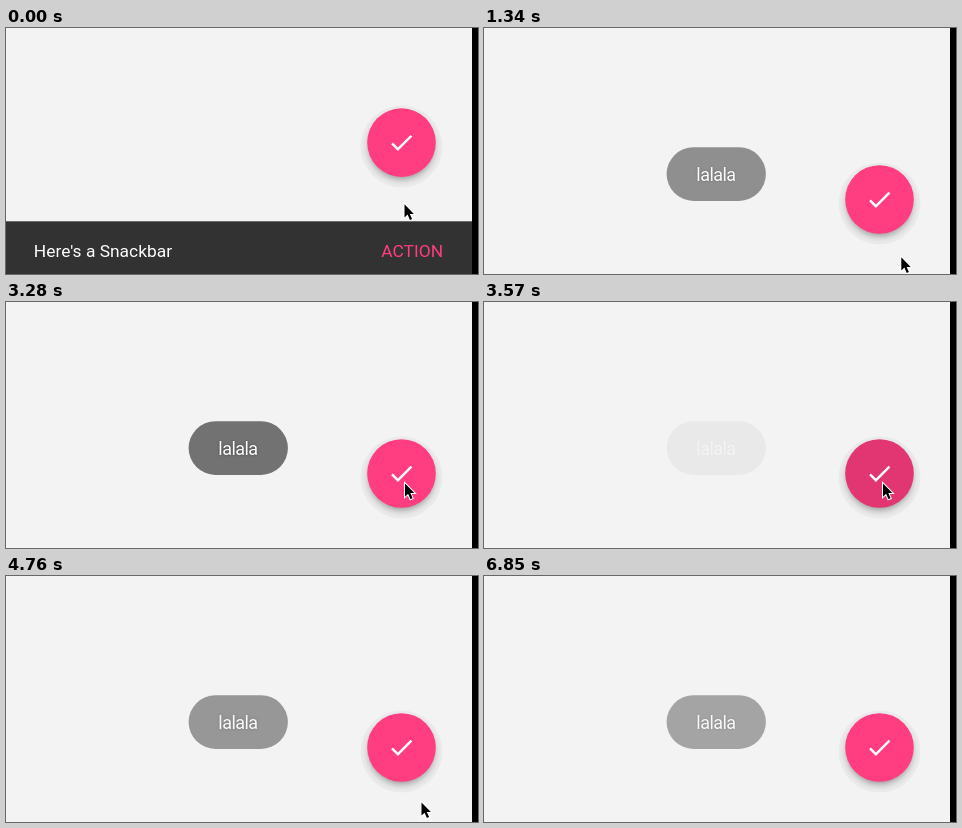
Write an HTML page that moves like this. It is 472 px wide and 246 px high and loops after 6.9 s.

```html
<!DOCTYPE html>
<html lang="en">
<head>
<meta charset="utf-8">
<title>Snackbar and toast</title>
<style>
  html, body { margin: 0; width: 100%; height: 100%; overflow: hidden; background: #f3f3f3; }
  svg { display: block; width: 472px; height: 246px; }
  text { font-family: Roboto, sans-serif; font-size: 17.4px; fill: #fff; }
  #toast text {
    font-size: 18px; letter-spacing: -.03em; text-anchor: middle;
    text-shadow: 0 0 2.5px rgba(0, 0, 0, .5);
  }
</style>
</head>
<body>
<svg viewBox="0 0 472 246">
  <defs>
    <filter id="blur" x="-30%" y="-30%" width="160%" height="160%">
      <feGaussianBlur stdDeviation="3"/>
    </filter>
  </defs>
  <rect width="472" height="246" fill="#f3f3f3"/>
  <g id="toast">
    <rect x="182.6" y="119.3" width="99.3" height="53.6" rx="26.8" fill="#666"/>
    <text x="232" y="153.3">lalala</text>
  </g>
  <g id="snackbar">
    <rect y="193.3" width="466" height="60" fill="#323232"/>
    <text x="27.8" y="228.7">Here's a Snackbar</text>
    <text x="375.3" y="228.7" style="fill:#ff3d80">ACTION</text>
  </g>
  <g id="fab">
    <circle cy="4" r="41" fill="#000" opacity=".035"/>
    <circle cy="4" r="33" fill="#000" opacity=".32" filter="url(#blur)"/>
    <circle r="34.3" fill="#ff3d80"/>
    <circle id="press" r="34.3" fill="#000"/>
    <path transform="scale(1.2) translate(-12 -12)" fill="#fff"
      d="M9 16.17 4.83 12l-1.42 1.41L9 19 21 7l-1.41-1.41z"/>
  </g>
  <rect x="466" width="6" height="246"/>
  <path id="cursor" d="M0 0V13.2L3.1 10.3 5.4 15.6 7.6 14.7 5.3 9.6H9.4Z"
    stroke="#fff" stroke-width="2" paint-order="stroke"/>
</svg>
<script>
const LOOP = 6900;
const TICK = 148.9; // the picture holds still between ticks

// All moments below are counted in ticks.
const pointerStart = { x: 398.5, y: 176.3 };
const glides = [
  { from: 0, to: 3, x: 417.3, y: 229.3 },
  { from: 11, to: 16, x: 399, y: 181.5 },
  { from: 25, to: 28, x: 415.5, y: 226.4 },
  { from: 33, to: 36, x: 417.5, y: 235 },
  { from: 38, to: 40, x: 418, y: 248 },
];

const ramp = (t, from, to) => Math.min(1, Math.max(0, (t - from) / (to - from)));
const smooth = p => p * p * (3 - 2 * p);
const easeOut = p => 1 - (1 - p) ** 3;

const dismissed = t =>
  smooth(ramp(t, 7, 9)) - smooth(ramp(t, 24, 26)) + smooth(ramp(t, 30, 32));

// The toast fades in, stays and fades out.
const toastPulse = (t, shown, gone) => ramp(t, shown, shown + 2) - ramp(t, gone, gone + 2.35);
const toastAlpha = t => toastPulse(t, 7.6, 21.8) + toastPulse(t, 30.7, 44.95);

const pressAlpha = t => .115 * (ramp(t, 22.5, 24) - ramp(t, 24, 26));

function pointerAt(t) {
  let { x, y } = pointerStart;
  for (const glide of glides) {
    const part = easeOut(ramp(t, glide.from, glide.to));
    x += (glide.x - x) * part;
    y += (glide.y - y) * part;
  }
  return [x, y];
}

const [toast, snackbar, fab, press, cursor] =
  ['toast', 'snackbar', 'fab', 'press', 'cursor'].map(id => document.getElementById(id));

function move(element, x, y) {
  element.setAttribute('transform', `translate(${x} ${y})`);
}

function draw(now) {
  const t = Math.floor((now % LOOP + 10) / TICK);
  const drop = 56.9 * dismissed(t);
  move(snackbar, 0, drop);
  move(fab, 395.5, 114.6 + drop);
  move(cursor, ...pointerAt(t));
  toast.setAttribute('opacity', toastAlpha(t));
  press.setAttribute('opacity', pressAlpha(t));
}

const start = performance.now();
function tick() {
  draw(performance.now() - start);
  requestAnimationFrame(tick);
}
tick();
</script>
</body>
</html>
```
